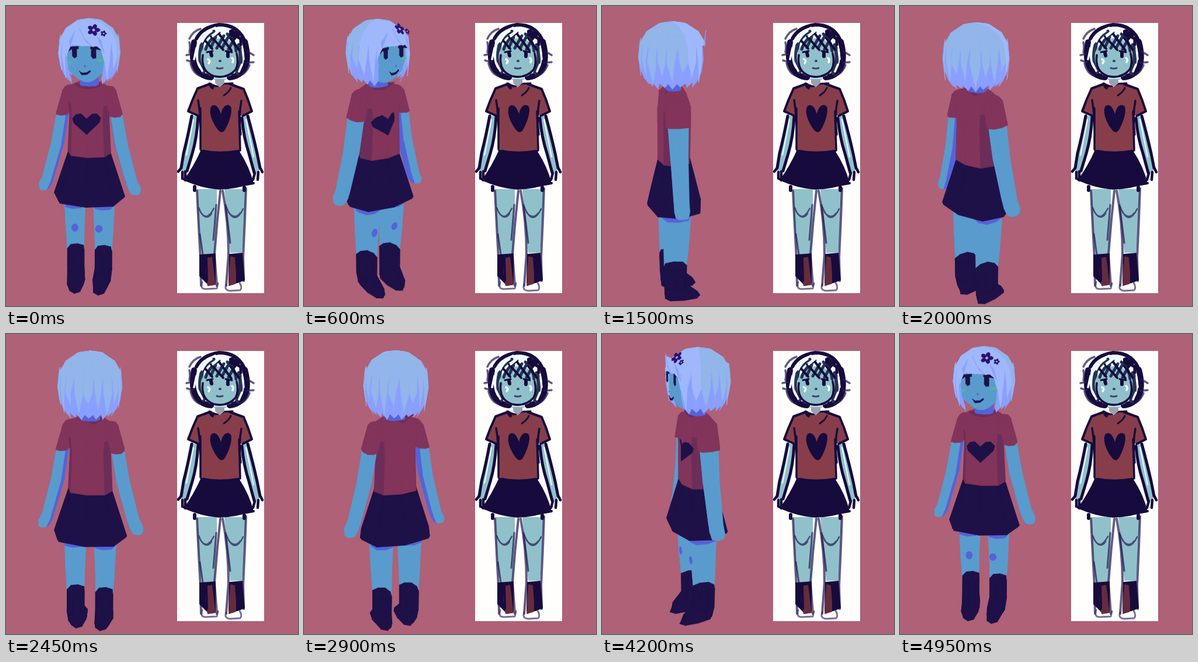
An HTML page with a canvas that plays this animation: 500x513 px, repeating every 5 s.

```html
<!DOCTYPE html>
<html>
<head>
<meta charset="utf-8">
<style>
html, body { margin: 0; width: 100%; height: 100%; overflow: hidden; background: #ae6177; }
canvas { display: block; width: 500px; height: 513px; }
</style>
</head>
<body>
<canvas id="stage" width="500" height="513"></canvas>
<script>
const ctx = document.getElementById('stage').getContext('2d');
const LOOP = 5000, STEP = 50;
const BG = '#ae6177', SKIN = '#5a9bcd', SHADE = '#5662d8', DARK = '#1e1147';
const SHIRT = '#82345a', SHIRT_DARK = '#6c2d59';
const HAIR = '#92b5ea', HAIR_FRONT = '#9fb8fb', HAIR_DARK = '#8a9fff';
const FLOWER = '#2c1270', CHEEK = '#50b69c';

// Camera: slightly above, the figure turns around an axis just in front of it.
const SIN = 0.35, COS = Math.sqrt(1 - SIN * SIN), DIST = 1100;
const OFFSET = { x: -4.4, z: -22 };
const START = -7.5 * Math.PI / 180;
const AXIS = 142.5;

function project([x, y, z], turn) {
  const a = START + turn * 2 * Math.PI, c = Math.cos(a), s = Math.sin(a);
  x += OFFSET.x; z += OFFSET.z;
  const wx = x * c + z * s, wz = z * c - x * s;
  const k = DIST / (DIST - wz * COS + y * SIN);
  return [144 + k * wx, 256 + k * (y * COS + wz * SIN)];
}

// Model point that appears at (sx, sy) at the given turn, for a chosen depth z.
function pin(sx, sy, z, turn = 0) {
  const p = [0, 0, z], dir = Math.cos(START + turn * 2 * Math.PI);
  for (let i = 0; i < 12; i++) {
    const [px, py] = project(p, turn);
    p[0] += (sx - px) / dir;
    p[1] += sy - py;
  }
  return p;
}

function vertex(v, dx, dz) {
  const mid = pin(AXIS, v, 0);
  const k = (pin(AXIS + 100, v, 0)[0] - mid[0]) / 100;
  return [dx * k, mid[1], dz * k];
}

function area(pts) {
  return pts.reduce((sum, [x, y], i) => {
    const [nx, ny] = pts[(i + 1) % pts.length];
    return sum + x * ny - nx * y;
  }, 0);
}

const bend = c => Math.sign(c) * Math.abs(c) ** 0.75;

// Rings are [row, centre x, half width, half depth, centre z].
function loft(rings, color, n = 8) {
  const loops = rings.map(([v, cx, hw, hd, cz = 0]) =>
    Array.from({ length: n }, (_, i) => {
      const a = i * 2 * Math.PI / n;
      return vertex(v, cx + hw * bend(Math.sin(a)), cz + hd * bend(Math.cos(a)));
    }));
  const faces = [];
  for (let r = 0; r + 1 < loops.length; r++) {
    for (let i = 0; i < n; i++) {
      const j = (i + 1) % n, p = loops[r], q = loops[r + 1];
      faces.push({
        pts: [p[i], p[j], q[j], q[i]],
        color: typeof color === 'function' ? color(i, r) : color
      });
    }
  }
  return faces;
}

// Flat detail on the surface, given by its look at one turn.
function decal(points, depth, color, turn = 0) {
  const zAt = typeof depth === 'function' ? depth : () => depth;
  return { pts: points.map(([x, y]) => pin(x, y, zAt(x, y), turn)), color, sign: Math.sign(area(points)) };
}

const oval = (x, y, rx, ry, petals = 0) => Array.from({ length: 30 }, (_, i) => {
  const a = i * Math.PI / 15;
  const r = petals ? 0.5 + 0.5 * Math.abs(Math.cos(a * petals / 2)) : 1;
  return [x + rx * r * Math.cos(a), y + ry * r * Math.sin(a)];
});

function paint(pts, color) {
  ctx.beginPath();
  pts.forEach(p => ctx.lineTo(...p));
  ctx.closePath();
  ctx.fillStyle = ctx.strokeStyle = color;
  ctx.lineWidth = 0.7;
  ctx.fill();
  ctx.stroke();
}

function drawMesh(faces, turn, sides = [-1, 1]) {
  const flat = faces.map(f => ({ color: f.color, pts: f.pts.map(p => project(p, turn)) }));
  for (const side of sides) {
    for (const f of flat) if (area(f.pts) * side > 0) paint(f.pts, f.color);
  }
}

function drawDecals(list, turn) {
  for (const d of list) {
    const pts = d.pts.map(p => project(p, turn));
    if (area(pts) * d.sign > 0) paint(pts, d.color);
  }
}

// side: 1 is the figure's left, -1 its right
function makeSide(side) {
  const inner = side > 0 ? [4, 5, 6, 7] : [0, 1, 2, 3];
  const x = dx => dx * side;
  return {
    arm: loft([
      [176, x(45), 10, 17], [235, x(55), 11, 14], [296, x(72), 10, 12],
      [307, x(77), 11, 12], [315, x(79), 8, 10]
    ], i => inner.includes(i) && i !== inner[0] && i !== inner[3] ? SHADE : SKIN),
    sleeve: loft([[139, x(33), 9, 14], [145, x(36), 10, 19], [183, x(46), 11, 20]], SHIRT),
    leg: loft([
      [322, x(25), 18, 23], [339, x(25), 18, 23], [380, x(25), 16, 21, -1], [424, x(24), 14, 18, -3]
    ], (i, r) => r ? SKIN : SHADE),
    shoe: loft([
      [418, x(24), 14.5, 19, -3], [449, x(24), 14.5, 18, -3],
      [464, x(22), 15, 27, 7], [472, x(20), 11, 29, 10]
    ], DARK),
    knee: [decal(side > 0 ? oval(159, 381, 6, 6) : oval(118, 379, 5.5, 6.5), 20, SHADE)]
  };
}

const left = makeSide(1), right = makeSide(-1);
const skirt = loft([[251, 0, 37, 27], [322, 0, 61, 45], [326, 0, 58, 44]], DARK);
const torso = loft([
  [132, 0, 24, 15], [141, 0, 40, 21], [165, 0, 36, 28, 1], [187, 0, 34, 28, 1], [250, 0, 37, 27]
], (i, r) => r > 1 && [1, 2, 5, 6].includes(i) ? SHIRT_DARK : SHIRT);
const neck = loft([[110, 0, 15, 14], [134, 0, 16, 13]], SHADE);
const shirtMarks = [
  decal([[117, 133], [166, 133], [156, 139], [140, 142], [125, 139]], 13, SHIRT_DARK),
  decal([[127, 143], [170, 143], [150, 155]], -13, SHIRT_DARK, 0.49),
  decal([[138, 220], [116, 200], [114, 192], [119, 186], [128, 184], [138, 193],
    [147, 185], [155, 184], [162, 191], [160, 199]], x => 29 - (x - 138) ** 2 / 45, DARK)
];

const face = loft([
  [45, 0, 42, 45], [88, 0, 41, 46], [104, -1, 34, 37, 7], [119, -1, 15, 15, 18], [124, -1, 6, 6, 18]
], SKIN, 12);
const faceMarks = [
  decal(oval(109, 97, 4, 2.5), 38, CHEEK),
  decal(oval(161, 93, 5, 2.5), 40, CHEEK),
  decal([[113, 71], [121, 71], [121, 87], [117, 89], [114, 86]], 46, DARK),
  decal([[146, 71], [154, 71], [154, 89], [149, 90], [146, 86]], 46, DARK),
  decal([[106, 78], [110, 70], [124, 69], [124, 73], [112, 74]], 45, DARK),
  decal([[144, 72], [146, 69], [158, 70], [165, 76], [156, 74], [146, 74]], 45, DARK),
  decal(oval(135, 103, 1.6, 1.3), 50, SHADE),
  decal([[125, 111], [130, 114.5], [138, 114], [144, 110], [145, 112], [139, 117], [130, 118]], 46, DARK)
];

function makeHair(sectors = 20) {
  const rings = [[21.5, 0], [26, 0.42], [39, 0.77], [58, 0.97], [80, 1], [100, 0.94], [115, 0.82]];
  const at = (v, r, a) => vertex(v, 53 * r * Math.sin(a), -1 + 57 * r * Math.cos(a));
  const faces = [];
  for (let i = 0; i < sectors; i++) {
    const w = 2 * Math.PI / sectors, a = i * w, b = a + w, mid = a + w / 2;
    const toFront = Math.min(mid, 2 * Math.PI - mid);
    const light = toFront < 1.1 ? HAIR_FRONT : HAIR;
    const open = toFront < 2 * w;
    const quad = (r, color) => {
      const [[v0, r0], [v1, r1]] = [rings[r], rings[r + 1]];
      const pts = [at(v0, r0, a), at(v0, r0, b), at(v1, r1, b), at(v1, r1, a)];
      faces.push({ pts: r ? pts : pts.slice(1), color });
    };
    for (let r = 0; r < (open ? 3 : 6); r++) quad(r, r < 3 ? light : HAIR_DARK);
    if (open) continue;
    const tip = 122 + i * 7 % 5;
    faces.push({ pts: [at(115, 0.82, a), at(115, 0.82, b), at(tip, 0.7, mid)], color: HAIR_DARK });
    const end = 96 + i * 7 % 5 * 5, top = i % 2 ? 50 : 58;
    faces.push({
      pts: [at(top, 0.95, a), at(top, 0.95, b), at(80, 1, b - (i % 3) * 0.05),
        at(end, 0.93, mid), at(80, 1, a + (i % 2) * 0.05)],
      color: light
    });
  }
  return faces;
}

const hair = makeHair();
const bangDepth = x => 53 - (x - 136) ** 2 / 100;
const flowerDepth = (x, y) => 42 + (y - 41) * 0.6 - (x - 150) * 0.25;
const hairMarks = [
  decal([[104, 56], [124, 42], [150, 44], [168, 57], [168, 94], [163, 75], [155, 68], [148, 70],
    [138, 61], [130, 69], [120, 63], [110, 69], [103, 86]], bangDepth, HAIR_FRONT),
  decal([[125, 38], [133, 54], [148, 70], [137, 61]], bangDepth, HAIR_DARK),
  decal([[118, 43], [110, 69], [108, 60]], bangDepth, HAIR_DARK),
  decal([[156, 52], [163, 60], [168, 80], [161, 66]], bangDepth, HAIR_DARK),
  decal(oval(150, 41, 11, 10, 5), flowerDepth, FLOWER),
  decal(oval(150, 41, 2, 2), flowerDepth, HAIR_FRONT),
  decal(oval(167, 47, 5, 5, 5), flowerDepth, FLOWER),
  decal(oval(167, 47, 1, 1), flowerDepth, HAIR_FRONT)
];

function drawFigure(turn) {
  const leftIsNear = Math.sin(START + turn * 2 * Math.PI) < 0;
  const [far, near] = leftIsNear ? [right, left] : [left, right];
  const drawArm = s => { drawMesh(s.arm, turn); drawMesh(s.sleeve, turn); };
  drawArm(far);
  for (const s of [far, near]) {
    drawMesh(s.leg, turn);
    drawDecals(s.knee, turn);
    drawMesh(s.shoe, turn);
  }
  drawMesh(skirt, turn);
  drawMesh(torso, turn);
  drawDecals(shirtMarks, turn);
  drawMesh(neck, turn);
  drawArm(near);
  drawMesh(hair, turn, [-1]);
  drawMesh(face, turn);
  drawDecals(faceMarks, turn);
  drawMesh(hair, turn, [1]);
  drawDecals(hairMarks, turn);
}

function drawSketch() {
  const ink = '#170a3d', soft = 'rgba(40,30,84,.72)', skin = '#90c1cb', red = '#873e4a';
  const fill = (d, color) => { ctx.fillStyle = color; ctx.fill(new Path2D(d)); };
  const line = (d, width, color = ink) => {
    ctx.strokeStyle = color;
    ctx.lineWidth = width;
    ctx.stroke(new Path2D(d));
  };
  ctx.lineCap = ctx.lineJoin = 'round';
  ctx.fillStyle = '#fffefd';
  ctx.fillRect(293, 29, 149, 462);

  // legs and boots
  fill('M327 313L361 313Q362 350 357 425L336 425Q328 380 327 313Z', skin);
  fill('M374 313L411 313Q408 380 404 422L384 422Q378 370 374 313Z', skin);
  line('M327 316Q330 380 333 430L334 478M367 316Q361 370 357 425L361 478', 4, soft);
  line('M371 316Q381 370 381 425L377 478M411 312Q409 370 406 430L407 470', 4, soft);
  line('M360 340L355 400M376 340L384 405M332 390L337 425', 3, soft);
  line('M330 345Q341 374 356 346M333 352Q343 368 352 355M377 343Q391 378 406 347M381 353Q392 366 401 354', 2.5, soft);
  fill('M331 425L359 423L359 475L347 478L331 462Z', ink);
  fill('M382 424L405 422L409 469L396 474L381 474Z', ink);
  fill('M343 431L353 429L359 477L345 479L341 455Z', '#642c3d');
  fill('M384 428L394 430L394 475L381 479Z', '#642c3d');
  line('M335 430L336 460M343 432L344 470M401 428L403 465M394 430L397 470', 4);
  line('M336 472Q332 484 342 484L361 483L363 474M377 476Q373 486 384 487L401 486Q405 482 400 473', 3, 'rgba(60,52,105,.7)');

  // arms
  fill('M319 188L330 188L320 247L307 286L300 282L306 240Z', skin);
  fill('M404 188L414 188L428 240L435 280L427 287L413 246Z', skin);
  line('M318 188Q311 225 304 252L300 277M329 190Q327 225 319 252L310 282', 5, ink);
  line('M404 192Q407 225 416 252L425 285M414 188Q424 225 430 252L435 277', 5, ink);
  line('M321 194L309 255M411 194L424 258', 2, '#f3fbfc');
  line('M300 277L295 283M302 284L302 295M307 283L307 298M436 278L439 284M432 284L431 297M426 286L423 297', 4.5);

  // clothes
  fill('M334 246L400 249Q417 275 424 303Q395 313 365 314Q335 312 304 298Q321 275 334 246Z', ink);
  line('M304 296Q360 316 424 303', 4);
  line('M323 309L323 315M408 310L408 315', 6);
  fill('M352 132L341 135L327 142L313 180L331 187L334 245Q366 254 401 245L402 187L420 181L407 141L391 134L378 131L366 138Z', red);
  line('M350 133L328 141Q319 160 312 180L330 188M382 133L407 142Q415 160 421 180L405 188', 4);
  line('M329 161Q333 185 333 217M403 162Q398 187 402 220M333 175L333 245M399 180L401 245M334 247Q367 254 401 247', 3.5);
  line('M385 140Q382 147 373 153M348 132Q358 142 373 133L388 132', 3);
  fill('M347 133L358 135L355 143Q348 141 347 133Z', ink);
  fill('M368 185C364 170 357 167 352 171C346 179 352 199 365 214Q371 219 376 210C383 197 388 181 385 172C380 166 371 169 368 185Z', ink);

  // head
  fill('M358 121L374 121L374 132L366 139L358 132Z', '#9aa2b0');
  line('M357 124L376 124', 4, skin);
  fill('M366 31C333 31 318 51 317 79C313 106 326 122 350 124L382 124C407 120 419 105 414 77C412 48 397 31 366 31Z', '#eff9fb');
  line('M322 62Q316 91 326 108Q335 121 351 122M409 61Q417 91 408 108Q398 121 383 122', 10);
  line('M326 56Q336 36 365 32Q395 32 407 56', 6);
  line('M335 67Q329 91 338 112M399 67Q406 95 396 114', 7, '#263554');
  line('M314 56Q320 43 333 39M314 62Q316 70 314 79M318 82L309 84M310 93L320 96M414 78L424 84M412 97L424 96M316 98Q320 115 332 119M417 101Q410 118 397 119', 3.5, soft);
  fill('M334 80Q343 56 369 55Q393 59 397 79Q401 104 385 119Q366 127 347 118Q331 104 334 80Z', skin);
  line('M334 70Q339 53 356 43M342 74Q346 59 365 45M351 71L359 53M361 72L373 51M370 72L380 54M381 74L389 60M394 77Q393 60 379 48', 5, '#203353');
  line('M340 58L353 73M351 52L372 75M365 48L386 76M384 55L399 75', 4);
  line('M336 61Q342 48 352 43M326 72L322 91M329 97L336 111M354 52L366 42M405 74L407 91M404 100L399 112M344 44L358 37M371 40L375 38', 3.5, '#f6fdff');
  line('M337 84Q333 112 356 120Q379 125 393 109Q399 98 395 81', 3.5);
  fill('M382 42Q388 37 392 43Q401 42 400 52L395 55L390 61Q390 53 382 50Z', ink);
  line('M402 57L402 66M390 49L405 58', 5);
  line('M344 79L354 77M376 77L387 79', 3);
  line('M351 80L352 85M380 80L380 86', 6);
  line('M346 91Q351 93 347 98M387 89Q391 91 388 96', 3.5, '#fff');
  line('M366 94L367 94', 4, '#2e4668');
  line('M361 106Q366 108 371 106', 3, '#43466e');
}

function frame() {
  const turn = Math.floor(performance.now() % LOOP / STEP) * STEP / LOOP;
  ctx.fillStyle = BG;
  ctx.fillRect(0, 0, 500, 513);
  drawSketch();
  drawFigure(turn);
  requestAnimationFrame(frame);
}
frame();
</script>
</body>
</html>
```
